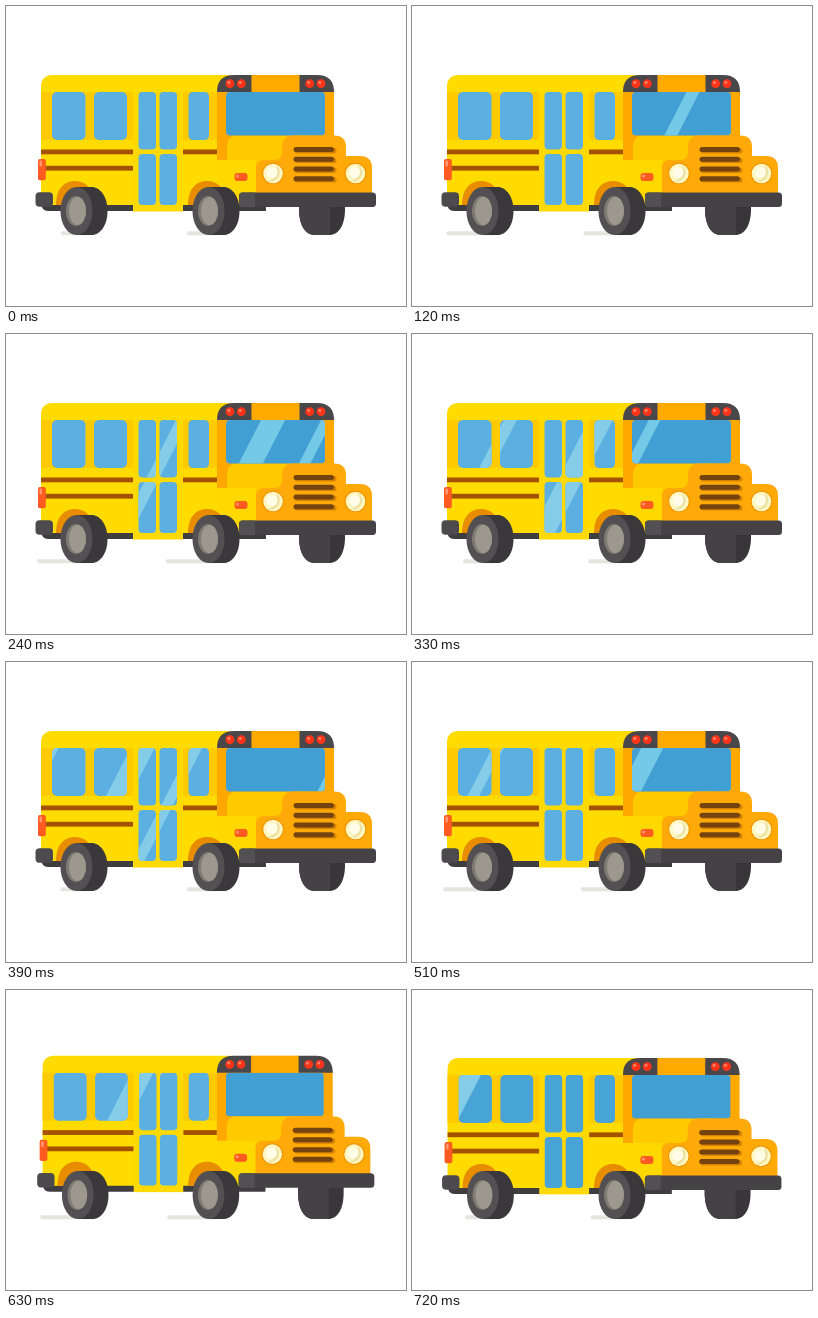
Recreate the animation shown at these times as an HTML page. Size 400 by 300 pixels, loop 750 ms.

```html
<!DOCTYPE html>
<html lang="en">
<head>
<meta charset="utf-8">
<title>School bus</title>
<style>
html, body { margin: 0; width: 100%; height: 100%; overflow: hidden; background: #fff; }
svg { display: block; width: 400px; height: 300px; }
</style>
</head>
<body>
<svg viewBox="0 0 400 300">
  <defs>
    <clipPath id="sideClip">
      <rect x="46" y="86" width="33.5" height="48" rx="5"/>
      <rect x="88" y="86" width="33" height="48" rx="5"/>
      <rect x="132.5" y="86" width="17.5" height="57.5" rx="4"/>
      <rect x="153.5" y="86" width="17.5" height="57.5" rx="4"/>
      <rect x="132.5" y="148" width="17.5" height="51" rx="4"/>
      <rect x="153.5" y="148" width="17.5" height="51" rx="4"/>
      <rect x="182.5" y="86" width="20.5" height="48" rx="4.5"/>
    </clipPath>
    <clipPath id="frontClip">
      <rect x="220" y="86" width="99" height="43.5" rx="4"/>
    </clipPath>
    <g id="wheel">
      <path d="M0 -24H15C24 -24 31 -14 31 0S24 24 15 24H0Z" fill="#3a383b"/>
      <ellipse rx="16" ry="24" fill="#525053"/>
      <ellipse cx="-.5" rx="10" ry="15" fill="#7f7b73"/>
      <ellipse cx="1" rx="8.5" ry="14" fill="#9c988d"/>
    </g>
    <g id="lamp">
      <circle r="4.4" fill="#ff3419"/>
      <circle cx="-1.2" cy="-1.3" r="1.5" fill="#ff8168"/>
    </g>
    <g id="headlight">
      <circle r="10.8" fill="#ec9400"/>
      <circle r="9.8" fill="#fff6c2"/>
      <path d="M3 -9.3A9.8 9.8 0 0 1 -6 7.8C2 7 6 -1 3 -9.3Z" fill="#ece2a4"/>
      <circle cx="-1" cy="-1" r="5.5" fill="#fffde8"/>
    </g>
    <g id="slat">
      <rect x="1" y="1" width="42" height="5.4" rx="2.7" fill="#d58200"/>
      <rect width="40.5" height="5" rx="2.5" fill="#75430f"/>
    </g>
  </defs>
  <rect width="400" height="300" fill="#fff"/>
  <g fill="#e6e4df">
    <rect id="rearShade" y="225.3" height="3.9" rx="1.5"/>
    <rect id="frontShade" y="225.3" height="3.9" rx="1.5"/>
  </g>
  <g id="farWheel">
    <path d="M293 196H339V203C339 219 333 229 323 229H309C299 229 293 219 293 203Z" fill="#39363a"/>
    <path d="M293 196H324V229H309C299 229 293 219 293 203Z" fill="#464146"/>
  </g>
  <g id="body">
    <path d="M35.500 195H260V205H42Q35.500 205 35.500 198Z" fill="#403d41"/>
    <path d="M35 199V81Q35 69 47 69H225V199Z" fill="#ffdb00"/>
    <path d="M35 86H215V134H35Z" fill="#ffca00"/>
    <path d="M211 86V199H252V150H230V86Z" fill="#ffd800"/>
    <g fill="#a55200">
      <rect x="35" y="143.500" width="92" height="4.800"/>
      <rect x="177" y="143.500" width="34" height="4.800"/>
      <rect x="35" y="159.800" width="92" height="4.800"/>
    </g>
    <rect x="127" y="86" width="50" height="119.500" fill="#ffd900"/>
    <g fill="#e88d00">
      <path d="M50 199C50 184 57 175 69 175S88 184 88 199Z"/>
      <path d="M182 199C182 184 189 175 201 175S220 184 220 199Z"/>
    </g>
    <g clip-path="url(#sideClip)">
      <rect id="sideGlass" x="40" y="80" width="170" height="125"/>
      <g id="sideGlare" fill="#85cce9"></g>
    </g>

    <path d="M211 154V84H328V140H236Q221 140 221 154Z" fill="#ffa900"/>
    <path d="M221 154V140Q221 129.500 231 129.500H300V165H250V154Z" fill="#ffca00"/>
    <rect x="245" y="69" width="49" height="18" fill="#ffaa00"/>
    <path d="M211 86Q211 69 228 69H245.500V86Z" fill="#4a474a"/>
    <path d="M293.500 86V69H311Q328 69 328 86Z" fill="#4a474a"/>
    <use href="#lamp" x="224" y="77.700"/>
    <use href="#lamp" x="235.300" y="77.700"/>
    <use href="#lamp" x="303.700" y="77.700"/>
    <use href="#lamp" x="315" y="77.700"/>
    <g clip-path="url(#frontClip)">
      <rect x="220" y="86" width="99" height="44" fill="#429fd3"/>
      <g id="frontGlare" fill="#73c9e6"></g>
    </g>

    <path d="M250 188V162Q250 154 258 154H268Q276 154 276 146V141Q276 129.500 288 129.500H328Q340 129.500 340 141V150H354Q366 150 366 162V188Z" fill="#ffaa08"/>
    <use href="#slat" x="287.500" y="141"/>
    <use href="#slat" x="287.500" y="150.700"/>
    <use href="#slat" x="287.500" y="160.500"/>
    <use href="#slat" x="287.500" y="170.200"/>
    <use href="#headlight" x="267" y="167.500"/>
    <use href="#headlight" x="349.500" y="167.500"/>
    <rect x="228.500" y="167" width="13" height="8" rx="3" fill="#ff5a20"/>
    <rect x="230" y="168.500" width="3" height="3" rx="1.500" fill="#ff9870"/>
    <rect x="32" y="153" width="7.800" height="21.300" rx="2" fill="#ff5a20"/>
    <rect x="33.500" y="154.500" width="2.500" height="6" rx="1" fill="#ff9870"/>
    <rect x="29.500" y="186.300" width="17.500" height="14.500" rx="4" fill="#4c4a4d"/>
    <rect x="233" y="186.500" width="137" height="14.500" rx="3.500" fill="#444245"/>
    <path d="M249 186.500H236.500Q233 186.500 233 190V197.500Q233 201 236.500 201H249Z" fill="#525053"/>
  </g>
  <g id="nearWheels">
    <use href="#wheel" x="70.500" y="205"/>
    <use href="#wheel" x="202.500" y="205"/>
  </g>
</svg>
<script>
const LOOP = 750, STEP = 30, SPEED = 0.87;
// start position and width of each reflection
const STRIPES = [[357, 13], [442, 24], [502, 11.5], [651, 22]];
const $ = id => document.getElementById(id);

for (const id of ['sideGlare', 'frontGlare']) {
  for (const [x, w] of STRIPES) {
    const p = document.createElementNS('http://www.w3.org/2000/svg', 'path');
    p.setAttribute('d', `M${x + 26} 78h${w}l-65 127h${-w}Z`);
    $(id).append(p);
  }
}

function streak(id, left, right) {
  $(id).setAttribute('x', left);
  $(id).setAttribute('width', right - left);
}

const hump = p => Math.sin(Math.PI * p) ** 2;

function draw(t) {
  const p = t % (LOOP / 2) / (LOOP / 2);
  streak('rearShade', 55 - 29 * hump(p), 85);
  streak('frontShade', 181 - 22 * hump(p ** 1.3), 215);

  const u = Math.max(0, (t - 510) / 240);
  const hop = Math.sin(Math.PI * u ** 0.85);
  const squeeze = `translate(200 0) scale(${1 - 0.01 * hop} 1) translate(-200 0)`;
  $('body').setAttribute('transform', `translate(0 ${-3.4 * hop}) ${squeeze}`);
  $('farWheel').setAttribute('transform', squeeze);
  $('nearWheels').setAttribute('transform', squeeze);

  const slide = `translate(${-SPEED * t} 0)`;
  $('sideGlare').setAttribute('transform', slide);
  $('frontGlare').setAttribute('transform', slide);
  $('sideGlass').setAttribute('fill', t >= 690 ? '#48a3d6' : '#5bb0e1');
}

function tick(now) {
  draw(Math.floor(now % LOOP / STEP) * STEP);
  requestAnimationFrame(tick);
}
draw(0);
requestAnimationFrame(tick);
</script>
</body>
</html>
```
